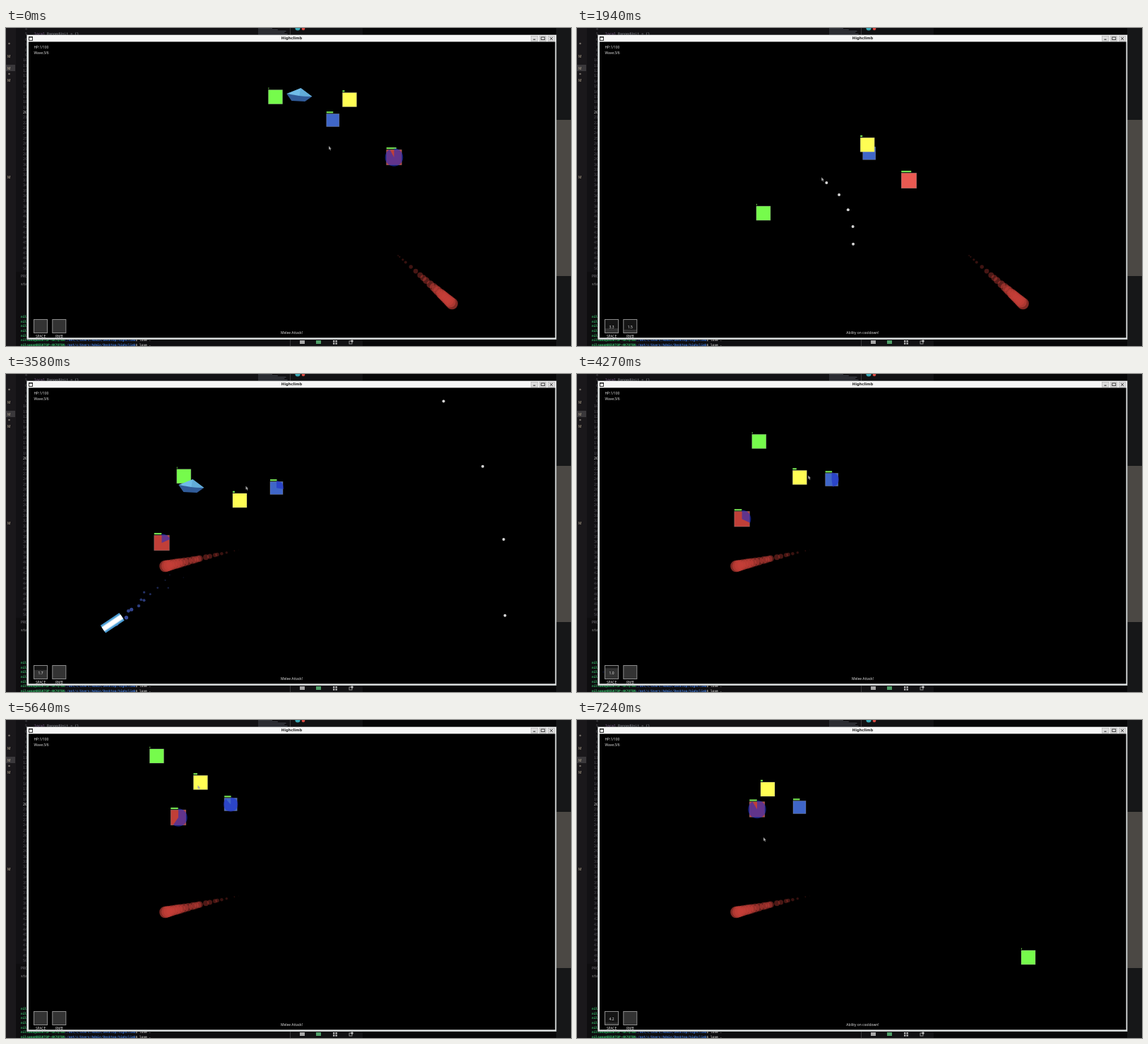
Write an HTML page with a canvas that moves like this. It is 800 px wide and 450 px high and loops after 7.27 s.

```html
<!DOCTYPE html>
<html lang="en">
<head>
<meta charset="utf-8">
<title>Highclimb</title>
<style>
html, body { margin: 0; width: 100%; height: 100%; overflow: hidden; background: #000; }
canvas { display: block; width: 800px; height: 450px; }
</style>
</head>
<body>
<canvas id="stage" width="800" height="450"></canvas>
<script>
const LOOP = 7270;
const canvas = document.getElementById('stage');
const UI = '4.9px "Noto Sans", sans-serif';
const MONO = '5px "DejaVu Sans Mono", monospace';
const TERM = 'bold 4.5px "DejaVu Sans Mono", monospace';
let g;

function box(x, y, w, h, fill) {
  g.fillStyle = fill;
  g.fillRect(x, y, w, h);
}

function dot(x, y, r, fill) {
  g.fillStyle = fill;
  g.beginPath();
  g.arc(x, y, r, 0, Math.PI * 2);
  g.fill();
}

function poly(points, fill) {
  g.fillStyle = fill;
  g.beginPath();
  for (const [x, y] of points) g.lineTo(x, y);
  g.closePath();
  g.fill();
}

function label(str, x, y, fill, font = UI, align = 'left') {
  g.font = font;
  g.textAlign = align;
  g.fillStyle = fill;
  g.fillText(str, x, y);
  return x + g.measureText(str).width;
}

function frame(x, y, w, h, stroke, lw = 1) {
  g.strokeStyle = stroke;
  g.lineWidth = lw;
  g.strokeRect(x, y, w, h);
}

const rnd = n => {
  const s = Math.sin(n * 127.1) * 43758.5453;
  return s - Math.floor(s);
};
const mix = (a, b, k) => a + (b - a) * k;

function drawDesktop() {
  box(0, 0, 800, 450, '#060607');
  box(14, 0, 389, 345, '#121114');
  box(14, 345, 389, 105, '#0e0d0f');
  box(0, 0, 14, 450, '#1a181b');
  box(0, 52, 13, 9, '#3a383b');
  for (const y of [42, 59, 76, 213]) label('M', 2, y, '#b9ab93');
  for (const y of [22, 65]) dot(4.5, y, 1.3, '#77706a');

  for (let n = 4; n <= 50; n++)
    label(n, 30, 121 + (n - 20) * 7.37, n === 20 ? '#d0d0d0' : '#55545a', MONO, 'right');
  label(' RangedUnit = {}', label('local', 40, 10, '#8d6b9c', MONO), 10, '#8c8f96', MONO);
  for (let i = 0; i < 5; i++) box(357, i * 2, 20 + rnd(i) * 24, 1, '#454850');

  label('PROBLEMS', 21, 353, '#77757b');
  label('started', 21, 364, '#a0a0a0', MONO);
  for (let i = 0; i < 7; i++) {
    const y = 410 + i * 6.65;
    let x = label('nilsoma@DESKTOP-4K7QTBN', 21, y, '#35bd6a', TERM);
    x = label(':/mnt/c/Users/Admin/Desktop/highclimb', x, y, '#3d74cf', TERM);
    label('$ love .', x, y, '#b0b0b0', TERM);
  }

  box(402, 0, 1, 450, '#3a3a3c');
  box(403, 0, 102, 450, '#111113');
  dot(413, 0, 3.6, '#39a8b5');
  dot(421, 1, 2.3, '#d84a42');
  box(416, 442, 7, 5, '#a8a8a8');
  box(439, 442, 7, 5, '#4f9f68');
  for (let i = 0; i < 4; i++)
    box(463 + i % 2 * 3.5, 442 + (i >> 1) * 3.3, 2.4, 2.4, '#b8b8b8');
  frame(486, 443, 4, 4, '#aaa', .8);
  dot(490, 443, 1.7, '#c0c0c0');

  box(779, 0, 21, 450, '#161718');
  box(779, 130, 21, 221, '#4b4844');
}

function drawWindow() {
  box(29, 9.5, 750.5, 431.5, '#8b9090');
  box(30, 10, 749, 430.5, '#dfe3e3');
  box(30, 10, 749, 9.3, '#f6f6f6');
  box(32, 19.5, 745.5, 418.8, '#000');
  label('Highclimb', 404.5, 16.4, '#222', 'bold 5.2px "DejaVu Sans", sans-serif', 'center');
  frame(32.5, 12.5, 5, 5, '#333');
  box(32, 12, 6, 1.6, '#222');
  for (let i = 0; i < 3; i++) {
    box(743.5 + i * 12, 11.5, 9.5, 7, '#dcdcdc');
    frame(743.5 + i * 12, 11.5, 9.5, 7, '#aaa', .6);
  }
  box(746.5, 15.7, 3, 1, '#222');
  frame(757.8, 13, 5, 3.6, '#222', .8);
  g.beginPath();
  g.moveTo(770.3, 13); g.lineTo(774, 17);
  g.moveTo(774, 13); g.lineTo(770.3, 17);
  g.stroke();

  label('HP:1/100', 39.5, 29.3, '#ddd');
  label('Wave:3/6', 39.5, 37, '#ddd');
  label('SPACE', 49, 437.6, '#ddd', UI, 'center');
  label('RMB', 75.3, 437.6, '#ddd', UI, 'center');
}

const backdrop = document.createElement('canvas');
backdrop.width = 800;
backdrop.height = 450;
g = backdrop.getContext('2d');
drawDesktop();
drawWindow();
g = canvas.getContext('2d');

// Key moments: the two blinks, the volley and the red dash
const BLINK = 260, BLINK2 = 6440, VOLLEY = 1452;
const CHARGE = 1740, DASH = 2310, LAND = 2660;

// Moves evenly through [time, x, y] points
function at(path, t) {
  let i = 1;
  while (i < path.length - 1 && path[i][0] < t) i++;
  const [t0, x0, y0] = path[i - 1], [t1, x1, y1] = path[i];
  const k = Math.min(1, (t - t0) / (t1 - t0));
  return [mix(x0, x1, k), mix(y0, y1, k)];
}

const player = [[0, 381.5, 97.5], [BLINK, 385, 110], [BLINK + 1, 385, 297], [VOLLEY, 297, 295],
  [2240, 243.7, 242], [2640, 243.7, 212], [4970, 263.8, 45.5], [5640, 213.5, 51],
  [BLINK2, 154, 51], [BLINK2 + 1, 655, 285], [7240, 639, 336]];
const yellow = [[0, 486.5, 101.5], [BLINK, 474, 102], [1120, 447.8, 142], [2640, 380, 185],
  [3580, 331, 179], [4970, 299.5, 113.5], [5640, 275.5, 88.5], [BLINK2, 236, 75], [7240, 270, 98]];
const blue = [[0, 462.8, 130.5], [BLINK, 454.5, 127], [1120, 434.5, 158.5], [1950, 413.5, 177.5],
  [2640, 413.5, 177.5], [4970, 338, 137.5], [5640, 318.2, 119.5], [BLINK2, 292, 107.5], [7240, 315, 123.5]];
const red = [[0, 549.5, 183], [1120, 498.5, 203], [CHARGE, 470, 216], [DASH, 470, 216],
  [LAND, 225, 272], [2940, 225, 270], [3580, 220.5, 239], [4970, 246.8, 171],
  [5640, 244, 138], [BLINK2, 225, 106], [7240, 255, 126.5]];
const mouse = [[0, 457, 167], [1120, 502, 179], [2640, 213.5, 238.5], [3580, 339.5, 158.5],
  [4970, 315, 128.5], [5640, 271, 92], [BLINK2, 655, 285], [7240, 264, 166]];

function unit([x, y], size, fill, hp) {
  const left = x - size / 2, top = y - size / 2;
  box(left, top, size, size, fill);
  frame(left, top, size, size, 'rgba(170,170,170,.4)', .8);
  box(left, top - 3.3, hp, 2.2, '#74e052');
}

function pie([x, y], r, k) {
  if (k <= 0 || k >= 1) return;
  g.fillStyle = 'rgba(30,45,200,.58)';
  g.beginPath();
  g.moveTo(x, y);
  g.arc(x, y, r, -Math.PI / 2, -Math.PI / 2 + k * Math.PI * 2);
  g.fill();
}

// Embers left behind a dash, sparser and older with distance from its end.
// age(d) is the age in ms of the ember d pixels back along the path.
function trail(x, y, angle, seed, age) {
  const marks = [];
  for (let d = 0, i = seed; d < 250; i++) {
    marks.push(d);
    d += 2 + rnd(i) * (2 + Math.min(d, 100) * .11);
  }
  for (const d of marks.reverse()) {
    const a = age(d), r = 9.9 - .053 * a;
    if (a >= 0 && r > .3)
      dot(x + d * Math.cos(angle), y + d * Math.sin(angle), r, `rgba(200,64,57,${.15 + .06 * r})`);
  }
}

function trails(t) {
  trail(631.5, 390, -2.413, 4, d => 30 + d * 1.35 + Math.max(0, t - DASH));
  if (t >= DASH) // aging stops shortly after landing
    trail(225.5, 272, -.219, 12, d => Math.min(t, LAND + 30) - LAND + d * 1.39);
}

const boltAt = t => [422 - (t - 2640) * .2883, 171 + (t - 2640) * .1926];

function bolt(t) {
  const start = 2600, life = 330;
  if (t < start || t > 4400) return;
  for (let i = 0; i < 70; i++) {
    const born = start + i * 22, age = t - born;
    if (age < 0 || age > life) continue;
    const [x, y] = boltAt(born);
    const drift = 20 * (.4 + age / life);
    dot(x + (rnd(i) - .5) * drift, y + (rnd(i + 90) - .5) * drift,
      3.2 * (1 - age / 400), `rgba(70,95,195,${.9 - age / 500})`);
  }
  g.save();
  g.translate(...boltAt(t));
  g.rotate(Math.atan2(-.1926, .2883));
  box(-16, -6.5, 32, 13, '#4a9bd2');
  box(-16, -4, 32, 8, '#a9d4ee');
  box(-16, -3, 32, 6, '#fff');
  g.restore();
}

function volley(t) {
  if (t < VOLLEY) return;
  const r = (t - VOLLEY) * .1936;
  for (let i = -2; i <= 2; i++) {
    const a = (-23.5 + i * 15) * Math.PI / 180;
    dot(297 + r * Math.cos(a), 295 + r * Math.sin(a), 2, '#d4d4d4');
  }
}

function gem(x, y) {
  g.save();
  g.translate(x, y);
  poly([[-18, -2], [18, 2], [8, 9], [-11, 8]], '#315c99');
  poly([[-18, -2], [2, -10], [18, 2], [0, 1]], '#70bce8');
  poly([[2, -10], [18, 2], [0, 1]], '#62acd9');
  g.restore();
}

function slot(x, total, since) {
  const left = since < 0 ? 0 : total - since / 1000;
  box(x, 412.5, 19, 19, '#333');
  if (left > 0) {
    box(x, 412.5, 19, 19 * left / total, '#151515');
    label(left.toFixed(1), x + 9.5, 424.9, '#e6e6e6', UI, 'center');
  }
  frame(x, 412.5, 19, 19, '#8c8c8c');
}

function cursor([x, y]) {
  poly([[x, y], [x, y + 5], [x + 1.2, y + 4.2], [x + 2.2, y + 6.2],
    [x + 3, y + 5.8], [x + 2.2, y + 3.9], [x + 3.6, y + 3.7]], '#a4a4a4');
}

function draw(t) {
  g.drawImage(backdrop, 0, 0);
  g.save();
  g.beginPath();
  g.rect(32, 19.5, 745.5, 418.8);
  g.clip();

  const p = at(player, t), b = at(blue, t), r = at(red, t);
  const charged = t > CHARGE && t < LAND;
  trails(t);
  unit(p, 20, '#76fb4c', .8);
  unit(r, 21.5, charged ? '#ea5a52' : '#c03f38', t < DASH ? 14 : 10.5);
  pie(r, 12.8, ((t - LAND + LOOP) % LOOP) / 5000);
  unit(b, 18, '#3f66c8', 9.5);
  pie(b, 10.3, (t - 2640) / 3400);
  unit(at(yellow, t), 20, '#fffd54', t > 4000 && t < BLINK2 ? 5.5 : 3);
  volley(t);
  bolt(t);
  if (t < 120) gem(p[0] + 33.8, p[1] - 2.5);
  if (t > 3480 && t < 3670) gem(262.3, 159);

  slot(39.5, 5, t - (t < BLINK2 ? BLINK : BLINK2));
  slot(65.8, 2, t - VOLLEY);
  const cooling = (t > 700 && t < 2000) || t > 6700;
  label(cooling ? 'Ability on cooldown!' : 'Melee Attack!', 404.5, 433.2, '#ddd', UI, 'center');
  cursor(at(mouse, t));
  g.restore();
}

const begin = performance.now();
function tick() {
  draw((performance.now() - begin) % LOOP);
  requestAnimationFrame(tick);
}
tick();
</script>
</body>
</html>
```
